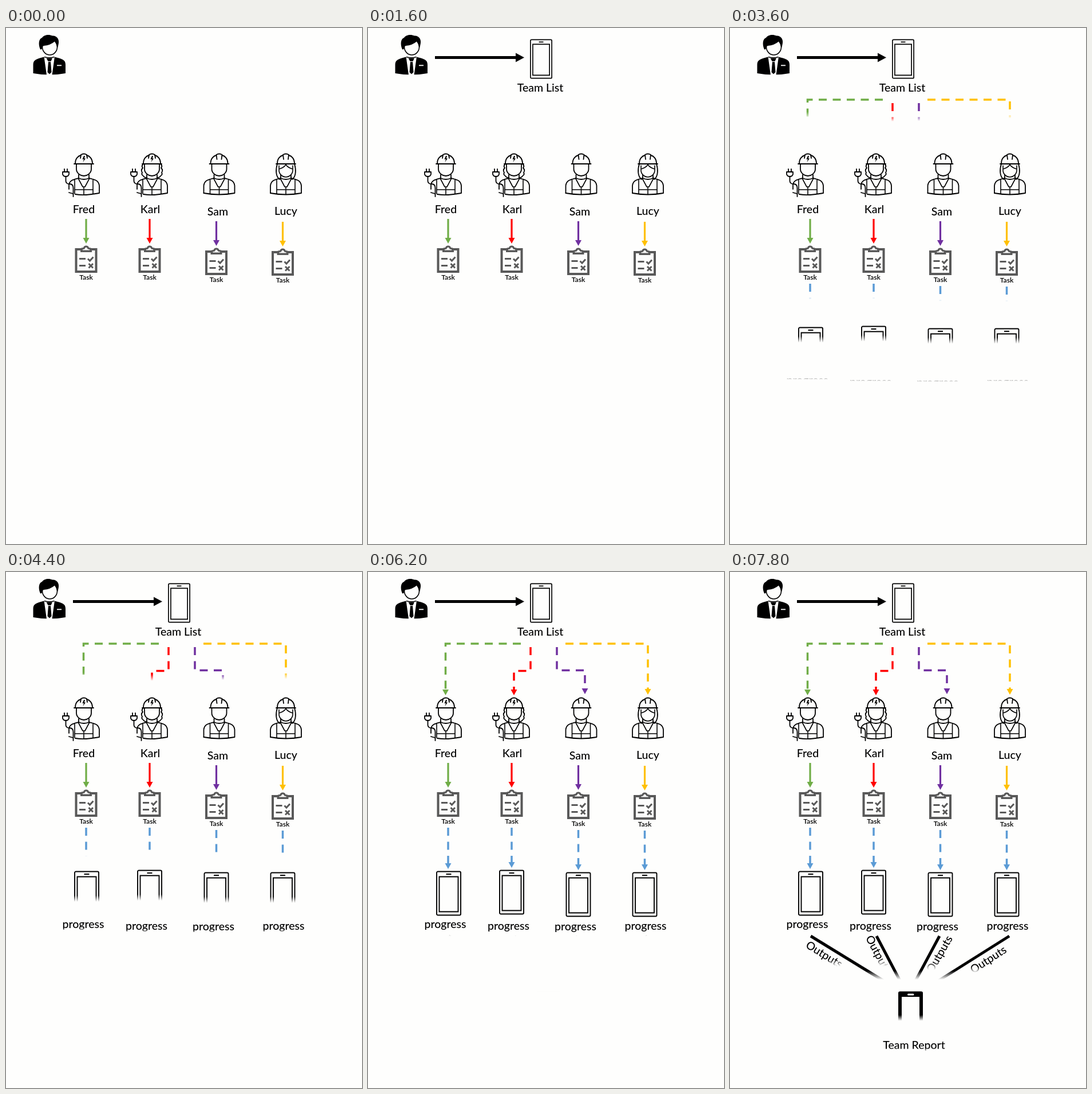
Recreate the animation shown at these times as an HTML page with a canvas. Size 622 by 900 pixels, loop 8000 ms.

```html
<!DOCTYPE html>
<html lang="en">
<head>
<meta charset="utf-8">
<title>Team workflow</title>
<style>
html, body { margin: 0; width: 100%; height: 100%; overflow: hidden; background: #fefefd; }
canvas { display: block; width: 622px; height: 900px; }
</style>
</head>
<body>
<canvas id="stage" width="622" height="900"></canvas>
<script>
const W = 622, H = 900, LOOP = 8000, STEP = 200;
const PAPER = '#fefefd', INK = '#000', GRAY = '#595959', BLUE = '#5b9bd5';
const GREEN = '#70ad47', RED = '#ff0000', PURPLE = '#7030a0', YELLOW = '#ffc000';
const SOFT = 0.13, WIPE_SPEED = 0.0004;

const stage = document.getElementById('stage').getContext('2d');
const layer = Object.assign(document.createElement('canvas'), { width: W, height: H }).getContext('2d');

const team = [
  { name: 'Fred', x: 136, nameX: 136, nameY: 323, color: GREEN, taskX: 140, taskY: 380, phone: [119.5, 522], label: [135, 621],
    kind: 'plug', route: [[267, 125], [135.5, 125], [135.5, 215]] },
  { name: 'Karl', x: 255, nameX: 252, nameY: 323, color: RED, taskX: 251, taskY: 380, phone: [229.5, 520], label: [245.5, 624],
    kind: 'curly', route: [[284, 131], [284, 172.5], [255, 172.5], [255, 215]] },
  { name: 'Sam', x: 372.5, nameX: 370, nameY: 326.5, color: PURPLE, taskX: 367.5, taskY: 384, phone: [346, 524], label: [362.5, 625],
    kind: 'plain', route: [[330, 131], [330, 171.5], [379, 171.5], [379, 213]] },
  { name: 'Lucy', x: 489, nameX: 489, nameY: 326, color: YELLOW, taskX: 483.5, taskY: 385, phone: [462, 524], label: [485, 624],
    kind: 'long', route: [[345, 125], [489, 125], [489, 214]] }
];

// Output lines: start, end, then label centre, angle in degrees and wipe box
const outputs = [
  { line: [141, 635, 296, 730], at: [164, 668], angle: 31.5, top: 626, height: 94 },
  { line: [256, 635, 306, 730], at: [258, 667], angle: 62, top: 610, height: 118 },
  { line: [366, 635, 315, 730], at: [367, 667], angle: -60, top: 620, height: 112 },
  { line: [488, 635, 337, 730], at: [452, 677], angle: -33, top: 645, height: 81 }
];

function text(c, str, x, y, size = 19.5, weight = 500) {
  c.font = `${weight} ${size}px Lato, "Open Sans", sans-serif`;
  c.textAlign = 'center';
  c.fillStyle = INK;
  c.fillText(str, x, y);
}

function strokePath(c, d, width = 1.8, color = INK) {
  c.lineWidth = width;
  c.strokeStyle = color;
  c.stroke(new Path2D(d));
}

function fillPath(c, d, color = INK) {
  c.fillStyle = color;
  c.fill(new Path2D(d));
}

function at(c, x, y, draw, scale = 1) {
  c.save();
  c.translate(x, y);
  c.scale(scale, scale);
  draw();
  c.restore();
}

// Polyline whose last segment ends in an arrowhead
function arrow(c, pts, color, { width = 3.2, dash = [], head = 10, half = 5.5 } = {}) {
  const [tx, ty] = pts[pts.length - 1], [px, py] = pts[pts.length - 2];
  const len = Math.hypot(tx - px, ty - py), ux = (tx - px) / len, uy = (ty - py) / len;
  const bx = tx - ux * head, by = ty - uy * head;
  c.save();
  c.strokeStyle = c.fillStyle = color;
  c.lineWidth = width;
  c.setLineDash(dash);
  c.beginPath();
  pts.slice(0, -1).forEach(p => c.lineTo(...p));
  c.lineTo(bx + ux, by + uy);
  c.stroke();
  c.beginPath();
  c.moveTo(tx, ty);
  c.lineTo(bx - uy * half, by + ux * half);
  c.lineTo(bx + uy * half, by - ux * half);
  c.fill();
  c.restore();
}

const dashed = { width: 3.5, dash: [14, 10.5] };

function phone(c, x, y, scale = 1) {
  at(c, x, y, () => {
    c.strokeStyle = INK;
    c.lineWidth = 1.9;
    c.beginPath();
    c.roundRect(0.5, 0.5, 42, 76, 2);
    c.rect(5, 9.5, 33, 61);
    c.stroke();
    strokePath(c, 'M17 5H26', 2);
  }, scale);
}

function reportPhone(c) {
  c.fillStyle = INK;
  c.beginPath();
  c.roundRect(294, 731.5, 43, 78, 3);
  c.fill();
  c.fillStyle = PAPER;
  c.fillRect(300, 741, 31, 56);
  c.beginPath();
  c.roundRect(310, 735.5, 11.5, 3, 1.5);
  c.fill();
}

function manager(c) {
  c.lineWidth = 1.6;
  c.strokeStyle = INK;
  c.beginPath();
  c.ellipse(76.5, 33, 13, 14, 0, 0, 7);
  c.stroke();
  fillPath(c, 'M60 37.5C56 29 57 19 63 17C67 11 76 11 81 13.5C89 13 93 20 92 26Q91 33 89.5 36Q89 29 85 23.5Q78 30 66 31Q63 32 62.5 37Z');
  fillPath(c, 'M47.5 79V64C47.5 55 54 54 66 50.5H85C98 54 104 55 104 64V79Q76 84 47.5 79Z');
  fillPath(c, 'M66.5 50L71 82H80.5L85 50Z', PAPER);
  fillPath(c, 'M70.5 52.5H81L78.5 58H73.5Z');
  fillPath(c, 'M74 59H78L79.5 77L76 80.5L72.5 77Z');
  strokePath(c, 'M67 50.5Q76 53 84.5 50.5', 1.6);
  strokePath(c, 'M89 65.3H97', 1.8, PAPER);
}

function worker(c, x, kind) {
  const plug = kind === 'plug' || kind === 'curly';
  at(c, x, 219, () => {
    c.lineJoin = c.lineCap = 'round';
    strokePath(c, 'M-15 17C-15 9 -10 4 -5 3M15 17C15 9 10 4 5 3M-17 18H17');
    strokePath(c, plug ? 'M-6 8L-5 2Q0 -1 5 2L6 8' : 'M-4 10L-5 2Q0 -1 5 2L4 10');
    if (plug) fillPath(c, 'M0 4L-2.5 10H0L-1.5 15L3 8.5H0.8L2 4Z');

    if (kind === 'long') {
      strokePath(c, 'M-15 18C-18 28 -18 40 -11 45M15 18C18 28 18 40 11 45');
      strokePath(c, 'M-12 27Q-4 25 0 19.5Q4 25 12 27M-12 21V29C-12 36 -6 41 0 41C6 41 12 36 12 29V21', 1.6);
    } else {
      strokePath(c, 'M-13 18V27C-13 34 -6 39 0 39C6 39 13 34 13 27V18');
    }
    if (kind === 'curly') {
      for (const side of [-1, 1]) {
        c.save();
        c.scale(side, 1);
        strokePath(c, 'M15 18Q19 22 16 25Q20 29 17 33Q19 37 15 39Q14 42 9 42');
        c.restore();
      }
    }
    strokePath(c, 'M-9 37V43Q0 47 9 43V37');

    const left = plug ? 'M-9 43C-17 45 -25 46 -26 55V62M-26 68L-19 70' : 'M-9 43C-17 45 -26 46 -27 56V69';
    strokePath(c, left);
    strokePath(c, `M9 43C17 45 26 46 27 56V69Q0 74 ${plug ? '-15 71' : '-27 69'}`);
    strokePath(c, 'M-10 43L-2 58H2L10 43M0 58V71', 1.6);
    strokePath(c, 'M-16 46V70M16 46V70M-16 63H-1M1 63H16', 1.6);

    if (plug) {
      strokePath(c, 'M-34 27V32M-29 27V32M-37 32H-26V36Q-27 40 -31.5 40Q-36 40 -37 36Z');
      strokePath(c, 'M-31.5 40V48Q-31 53 -25 53Q-18.5 53 -18.5 60V75');
    }
    c.lineJoin = 'miter';
    c.lineCap = 'butt';
  });
}

function clipboard(c, x, y) {
  at(c, x, y, () => {
    strokePath(c, 'M-17.5 6H17.5V45H-17.5Z', 4, GRAY);
    fillPath(c, 'M-10 11V5Q-9 3 -5 3Q-4 -0.5 0 -0.5Q4 -0.5 5 3Q9 3 10 5V11Z', GRAY);
    fillPath(c, 'M-6 7.5V6Q-2 6 -2 4Q0 1 2 4Q2 6 6 6V7.5Z', PAPER);
    strokePath(c, 'M-12 22.5H-1M-12 34.5H-1', 3, GRAY);
    strokePath(c, 'M3 22.5L6.5 26L12.5 19.5M4.5 31L12 38.5M12 31L4.5 38.5', 3, GRAY);
  });
}

function teamList(c, t) {
  const left = Math.max(0, 1 - (t - 1010) / 500);
  if (left > 1) return;
  // each part flies in from just outside the left edge
  const slide = (edge, draw) => at(c, -edge * left, 0, draw);
  slide(322, () => phone(c, 283.5, 20, 0.885));
  slide(273, () => arrow(c, [[117, 51.5], [273, 51.5]], INK, { width: 5, head: 15, half: 8 }));
  slide(341, () => text(c, 'Team List', 301, 111));
}

// Reveal a drawing from top to bottom with a soft edge
function wipe(start, t, top, height, draw) {
  const edge = (t - start) * WIPE_SPEED;
  if (edge <= 0) return;
  if (edge - SOFT >= 1) return draw(stage);
  layer.globalCompositeOperation = 'source-over';
  layer.clearRect(0, 0, W, H);
  draw(layer);
  const fade = layer.createLinearGradient(0, top + (edge - SOFT) * height, 0, top + edge * height);
  fade.addColorStop(0, 'rgba(0,0,0,1)');
  fade.addColorStop(1, 'rgba(0,0,0,0)');
  layer.globalCompositeOperation = 'destination-in';
  layer.fillStyle = fade;
  layer.fillRect(0, 0, W, H);
  stage.drawImage(layer.canvas, 0, 0);
}

function drawProgress(t) {
  const show = (...args) => wipe(2650, t, ...args);
  for (const m of team) {
    const top = m.route[0][1] - (m.route[0][1] < 130 ? 2 : 0);
    show(top, m.route[m.route.length - 1][1] - top, c => arrow(c, m.route, m.color, dashed));
    const y = m.taskY + 66, tip = m.phone[1] - 4;
    show(y, tip - y, c => arrow(c, [[m.taskX, y], [m.taskX, tip]], BLUE, dashed));
    show(m.phone[1] - 5, 83, c => phone(c, ...m.phone));
    show(m.label[1] - 24, 42, c => text(c, 'progress', ...m.label));
  }
}

function drawReport(t) {
  const show = (...args) => wipe(6150, t, ...args);
  for (const o of outputs) {
    const [x1, y1, x2, y2] = o.line;
    show(633, 118, c => strokePath(c, `M${x1} ${y1}L${x2} ${y2}`, 5));
    show(o.top, o.height, c => at(c, ...o.at, () => {
      c.rotate(o.angle * Math.PI / 180);
      text(c, 'Outputs', 0, 5.5);
    }));
  }
  show(730, 80, reportPhone);
  show(804, 49, c => text(c, 'Team Report', 321.5, 832));
}

function drawBase(c) {
  manager(c);
  for (const m of team) {
    worker(c, m.x, m.kind);
    text(c, m.name, m.nameX, m.nameY);
    arrow(c, [[m.taskX, m.taskY - 47], [m.taskX, m.taskY - 4]], m.color);
    clipboard(c, m.taskX, m.taskY);
    text(c, 'Task', m.taskX, m.taskY + 58.7, 12.2, 600);
  }
}

function frame() {
  const t = Math.floor(performance.now() % LOOP / STEP) * STEP;
  stage.fillStyle = PAPER;
  stage.fillRect(0, 0, W, H);
  drawBase(stage);
  teamList(stage, t);
  drawProgress(t);
  drawReport(t);
  requestAnimationFrame(frame);
}
frame();
</script>
</body>
</html>
```
